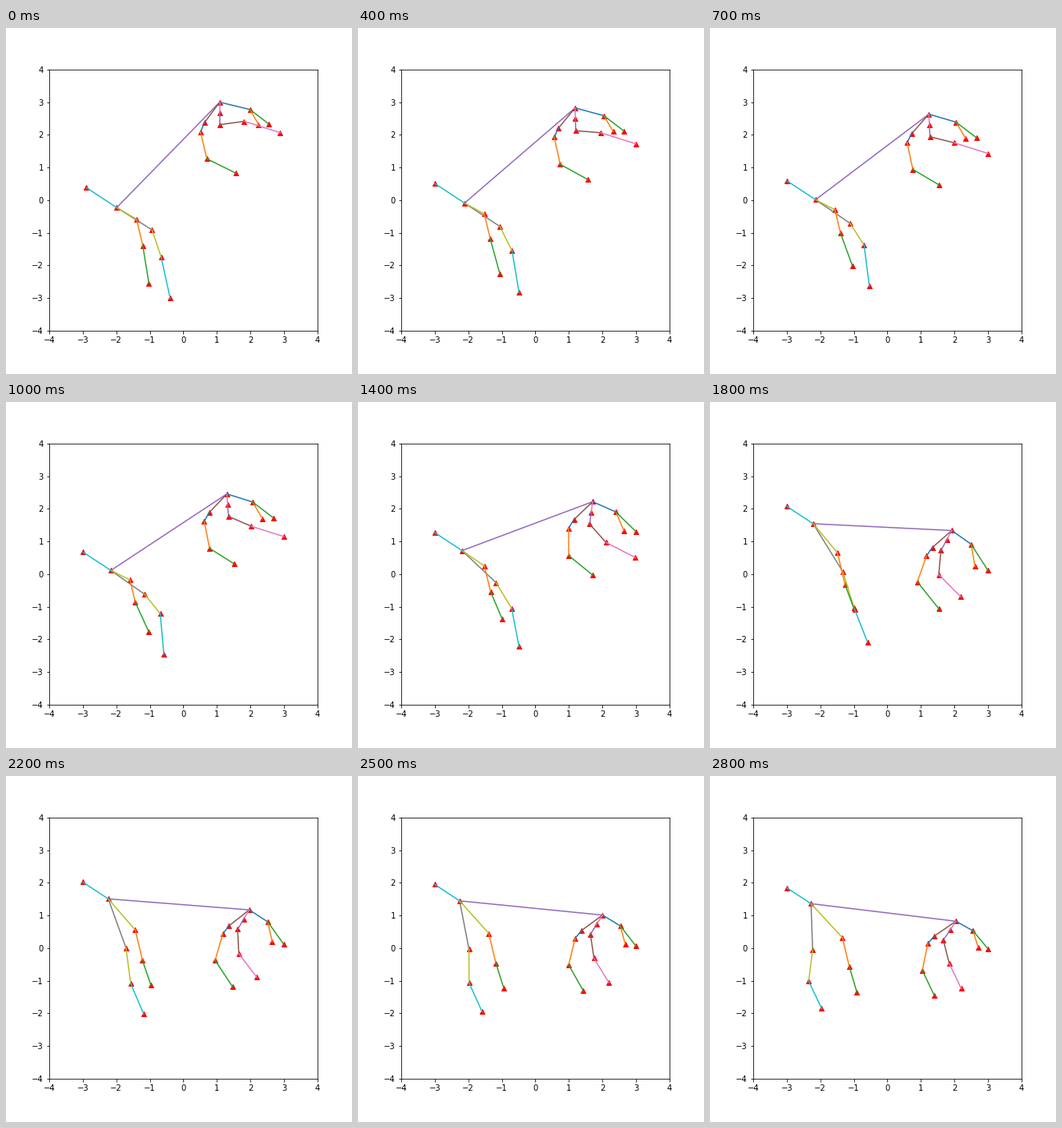
A matplotlib script that plays this animation: 432x432 px, repeating every 2900 ms.

```python
import numpy as np
import matplotlib.pyplot as plt
from matplotlib.animation import FuncAnimation

FRAMES = 29
STEP_MS = 100
KEYS = [0, 10, 18, 28]  # leap, stretch, landing, stand

# joint: (parent, bone length, bone angle in degrees); each is one value,
# a (first, last) pair or one value per key pose
RIG = {
    "neck": ("hip", (4.46, 4.18, 4.13, 4.35), (46.4, 34.1, -2.9, -7.1)),
    "tail": ("hip", (1.09, 0.87), 146),
    "head": ("neck", (0.93, 0.59), (-14, -18, -36, -30)),
    "nose": ("head", (0.72, 0.79, 0.94, 0.70), (-38, -38, -58, -51)),
    "l_elbow": ("neck", 1.08, (-122, -141)),
    "l_wrist": ("l_elbow", 0.84, (-77, -79, -109, -101)),
    "l_paw": ("l_wrist", (0.97, 0.87, 1.05, 0.84), (-27, -33, -52, -65)),
    "r_elbow": ("neck", 0.69, (-90, -86, -118, -123)),
    "r_wrist": ("r_elbow", 0.74, (8, -24, -95, -76)),
    "r_paw": ("r_wrist", (1.13, 0.84), (-18, -18, -46, -65)),
    "a_knee": ("hip", (1.26, 1.25, 1.71, 1.41), (-33, -36, -59, -88)),
    "a_hock": ("a_knee", (0.88, 0.75, 1.20, 0.97), (-72, -52, -73, -97)),
    "a_paw": ("a_hock", (1.28, 1.25, 1.07, 0.92), (-78, -85, -69, -65)),
    "b_knee": ("hip", (0.69, 0.64, 1.15, 1.40), (-31, -27, -51, -48)),
    "b_hock": ("b_knee", (0.83, 0.70, 1.00, 0.90), -77),
    "b_paw": ("b_hock", (1.18, 0.99, 0.76, 0.82), (-81, -66, -70, -74)),
}

# joint: (start, end, place along that bone; imaginary part is sideways)
ATTACHED = {
    "jaw": ("head", "nose", 0.68 - 0.28j),
    "l_shoulder": ("neck", "l_elbow", 0.72 - 0.05j),
    "r_shoulder": ("neck", "r_elbow", 0.47),
}

# (start, end, colour cycle index), in drawing order
BONES = [
    ("neck", "head", 0), ("head", "jaw", 1), ("head", "nose", 2),
    ("neck", "hip", 4), ("neck", "l_shoulder", 5), ("neck", "r_shoulder", 6),
    ("hip", "a_knee", 7), ("hip", "b_knee", 8), ("hip", "tail", 9),
    ("l_shoulder", "l_elbow", 0), ("l_elbow", "l_wrist", 1),
    ("l_wrist", "l_paw", 2),
    ("r_shoulder", "r_elbow", 4), ("r_elbow", "r_wrist", 5),
    ("r_wrist", "r_paw", 6),
    ("a_knee", "a_hock", 8), ("a_hock", "a_paw", 9),
    ("b_knee", "b_hock", 1), ("b_hock", "b_paw", 2),
]


def fall(frame):
    """Let the drop to the landing start slowly; leave other times alone."""
    _, begin, end, _ = KEYS
    if begin < frame < end:
        return begin + (end - begin) * ((frame - begin) / (end - begin)) ** 1.5
    return frame


def blend(values, frame):
    values = np.atleast_1d(values)
    if len(values) == len(KEYS):
        return np.interp(fall(frame), KEYS, values)
    return np.interp(frame, np.linspace(0, FRAMES - 1, len(values)), values)


def pose(frame):
    """Joint positions, centred and scaled to a span of 6."""
    joints = {"hip": 0j}
    for name, (parent, length, angle) in RIG.items():
        turn = np.exp(1j * np.radians(blend(angle, frame)))
        joints[name] = joints[parent] + blend(length, frame) * turn
    for name, (a, b, place) in ATTACHED.items():
        joints[name] = joints[a] + place * (joints[b] - joints[a])
    points = np.array([(z.real, z.imag) for z in joints.values()])
    low, high = points.min(axis=0), points.max(axis=0)
    points = (points - (low + high) / 2) * 6 / (high - low).max()
    return dict(zip(joints, points))


fig = plt.figure(figsize=(6, 6), dpi=72, facecolor="white")
fig.subplots_adjust(left=0.125, right=0.9, bottom=0.125, top=0.88)
ax = fig.add_subplot()
ax.set_xlim(-4, 4)
ax.set_ylim(-4, 4)
ax.set_xticks(range(-4, 5))
ax.set_yticks(range(-4, 5))

dots = ax.scatter(*zip(*pose(0).values()), c="r", marker="^")
lines = [ax.plot([], [], color=f"C{c}")[0] for _, _, c in BONES]


def draw(frame):
    joints = pose(frame)
    dots.set_offsets(list(joints.values()))
    for line, (a, b, _) in zip(lines, BONES):
        line.set_data(*zip(joints[a], joints[b]))
    return [dots, *lines]


anim = FuncAnimation(fig, draw, frames=FRAMES, init_func=lambda: draw(0),
                     interval=STEP_MS, repeat=True, repeat_delay=0)
plt.show()
```
